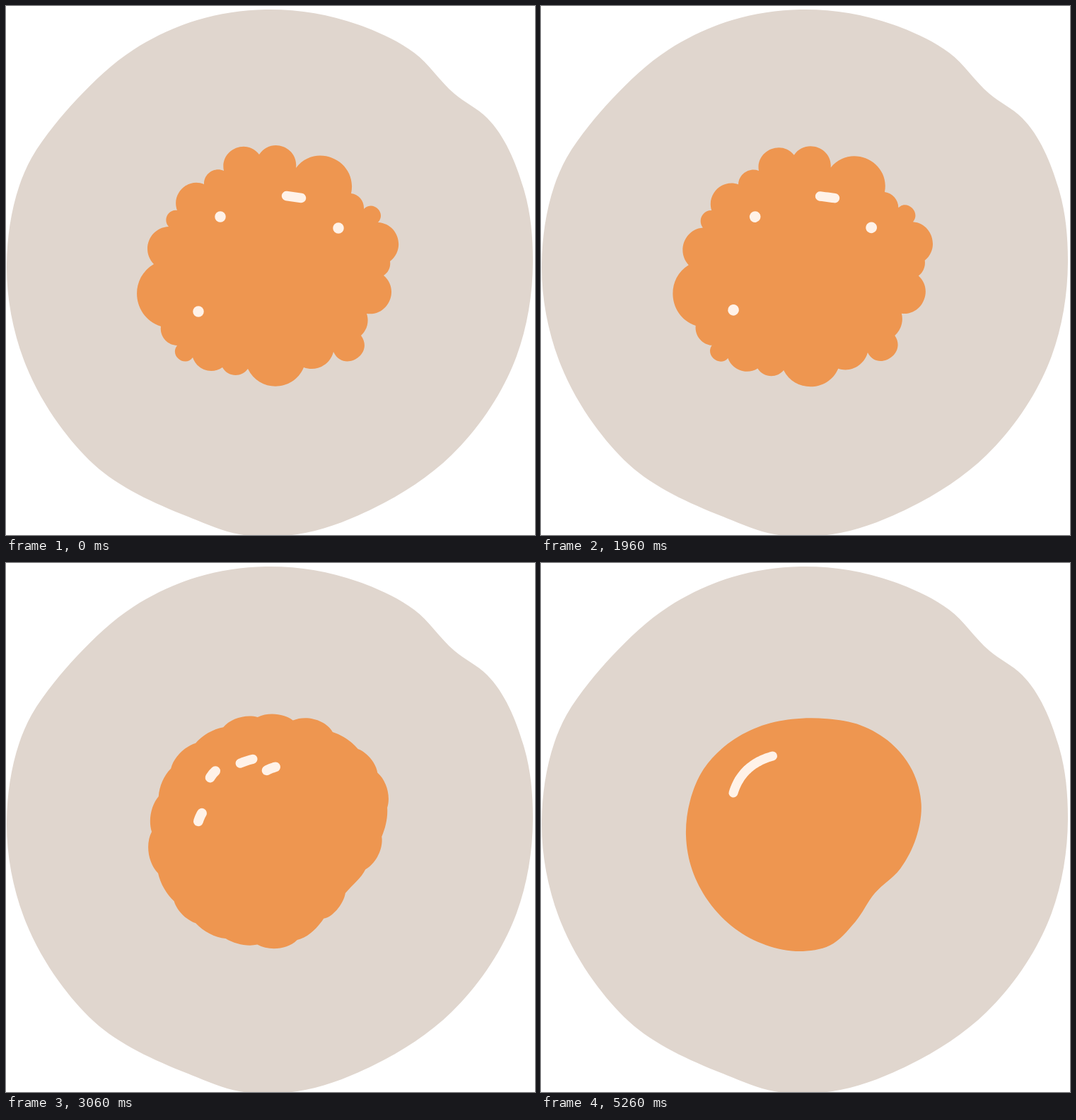
Recreate the animation shown at these times as an HTML page. Size 748 by 748 pixels, loop 5360 ms.

```html
<!DOCTYPE html>
<html lang="en">
<head>
<meta charset="utf-8">
<title>Egg</title>
<style>
  html, body { margin: 0; width: 100%; height: 100%; overflow: hidden; background: #fff; }
  svg { display: block; width: 100%; height: 100%; }
  #white { fill: #e0d6ce; }
  #yolk { fill: #ee9650; }
  #shine path { fill: none; stroke: #fff2e8; stroke-linecap: round; stroke-linejoin: round; }
</style>
</head>
<body>
<svg viewBox="0 0 748 748">
  <path id="white"/>
  <path id="yolk"/>
  <g id="shine"></g>
</svg>
<script>
const LOOP = 5360;
const $ = id => document.getElementById(id);
const newPath = () => document.createElementNS('http://www.w3.org/2000/svg', 'path');
const mix = (a, b, k) => a.map((v, i) => v + (b[i] - v) * k);
const range = (n, f) => Array.from({ length: n }, (_, i) => f(i));
const group = (list, size) =>
  range(list.length / size, i => list.slice(i * size, (i + 1) * size));

// Progress from start to end, eased with end handles (x1, 0) and (x2, 1).
function timing(start, end, x1, x2) {
  return t => {
    const u = Math.min(1, Math.max(0, (t - start) / (end - start)));
    let lo = 0, hi = 1, s = 0.5;
    for (let i = 0; i < 24; i++) {
      s = (lo + hi) / 2;
      const x = 3 * (1 - s) * (1 - s) * s * x1 + 3 * (1 - s) * s * s * x2 + s * s * s;
      if (x < u) lo = s; else hi = s;
    }
    return s * s * (3 - 2 * s);
  };
}

// Closed smooth curve through points, as one cubic of eight numbers per segment.
function smooth(pts) {
  const n = pts.length;
  const at = i => pts[(i + n) % n];
  const len = i => Math.hypot(at(i + 1)[0] - at(i)[0], at(i + 1)[1] - at(i)[1]);
  const dir = i => [0, 1].map(k => {
    const a = len(i - 1), b = len(i);
    return ((at(i)[k] - at(i - 1)[k]) / a * b + (at(i + 1)[k] - at(i)[k]) / b * a) / (a + b);
  });
  return pts.map((p, i) => {
    const q = at(i + 1), h = len(i) / 3, d = dir(i), e = dir(i + 1);
    return [...p, p[0] + d[0] * h, p[1] + d[1] * h, q[0] - e[0] * h, q[1] - e[1] * h, ...q];
  });
}

// Closed chain of arcs between [x, y, bulge]; bulge is height over half the chord.
function scallop(pts) {
  return pts.map(([x, y, bulge], i) => {
    const [u, v] = pts[(i + 1) % pts.length];
    const dx = u - x, dy = v - y;
    const k = (1 + bulge * bulge) / 3, turn = 2 * Math.atan(bulge);
    const c = Math.cos(turn) * k, s = Math.sin(turn) * k;
    return [x, y, x + dx * c + dy * s, y + dy * c - dx * s,
      u - dx * c + dy * s, v - dy * c - dx * s, u, v];
  });
}

const toPath = segs => `M${segs[0].slice(0, 2)}` + segs.map(s => 'C' + s.slice(2)).join('') + 'Z';

// Evenly spaced points along a closed outline.
function spread(segs, n) {
  const path = newPath();
  path.setAttribute('d', toPath(segs));
  const step = path.getTotalLength() / n;
  return range(n, i => {
    const p = path.getPointAtLength(i * step);
    return [p.x, p.y];
  });
}

const white = smooth(group([
  367,5, 497,26, 577,66, 634,124, 680,158, 733,262, 745,363, 722,495, 630,635, 520,710,
  412,747, 330,747, 262,724, 124,648, 75,592, 25,500, 1,365, 36,215, 68,169, 100,132,
  180,62, 270,20], 2));

// Notches between the bumps, clockwise.
const bumpy = scallop(group([
  308,233,.8, 358,210,.8, 410,229,.8, 488,265,.4, 506,287,1, 526,306,.7, 543,361,.3,
  534,381,.75, 510,435,.3, 502,466,1.1, 463,489,.45, 421,511,.65, 342,513,.55, 306,511,.5,
  264,497,1, 242,480,.45, 219,453,.65, 209,365,.65, 230,312,.7, 242,289,.65, 280,252,.55], 3));

const round = smooth(spread(smooth(group([
  307,232, 384,219.5, 465,235, 515,276, 538,347, 511,428, 464,476, 440,513, 408,541,
  366,549, 286,525, 217,443, 205,373, 238,280], 2)), bumpy.length));

// Glints start as dots (x, y, half length) and join end to end into one arc.
const dots = group([272,432,0, 303,298,0, 407,270,10.5, 470,314,0], 3);
const arc = [[272, 325], [284, 285], [327.5, 273]];
const onArc = s => mix(mix(arc[0], arc[1], s), mix(arc[1], arc[2], s), s);
const STEPS = 6;

const yolkTime = timing(1640, 4320, .3, .38);
const glintTime = timing(1800, 4600, .24, .42);
const marks = dots.map(() => $('shine').appendChild(newPath()));

function draw(t) {
  const y = yolkTime(t), g = glintTime(t);
  $('yolk').setAttribute('d', toPath(bumpy.map((s, i) => mix(s, round[i], y))));
  dots.forEach(([cx, cy, half], i) => {
    const line = range(STEPS + 1, j => {
      const k = j / STEPS, side = (2 * k - 1) * half;
      return mix([cx + side, cy + side * .14], onArc((i + k) / dots.length), g);
    });
    marks[i].setAttribute('d', 'M' + line.join('L'));
    marks[i].setAttribute('stroke-width', (half ? 13.5 : 15.5) * (1 - g) + 13 * g);
  });
}

$('white').setAttribute('d', toPath(white));
draw(0);
const begin = performance.now();
(function tick() {
  draw((performance.now() - begin) % LOOP);
  requestAnimationFrame(tick);
})();
</script>
</body>
</html>
```
